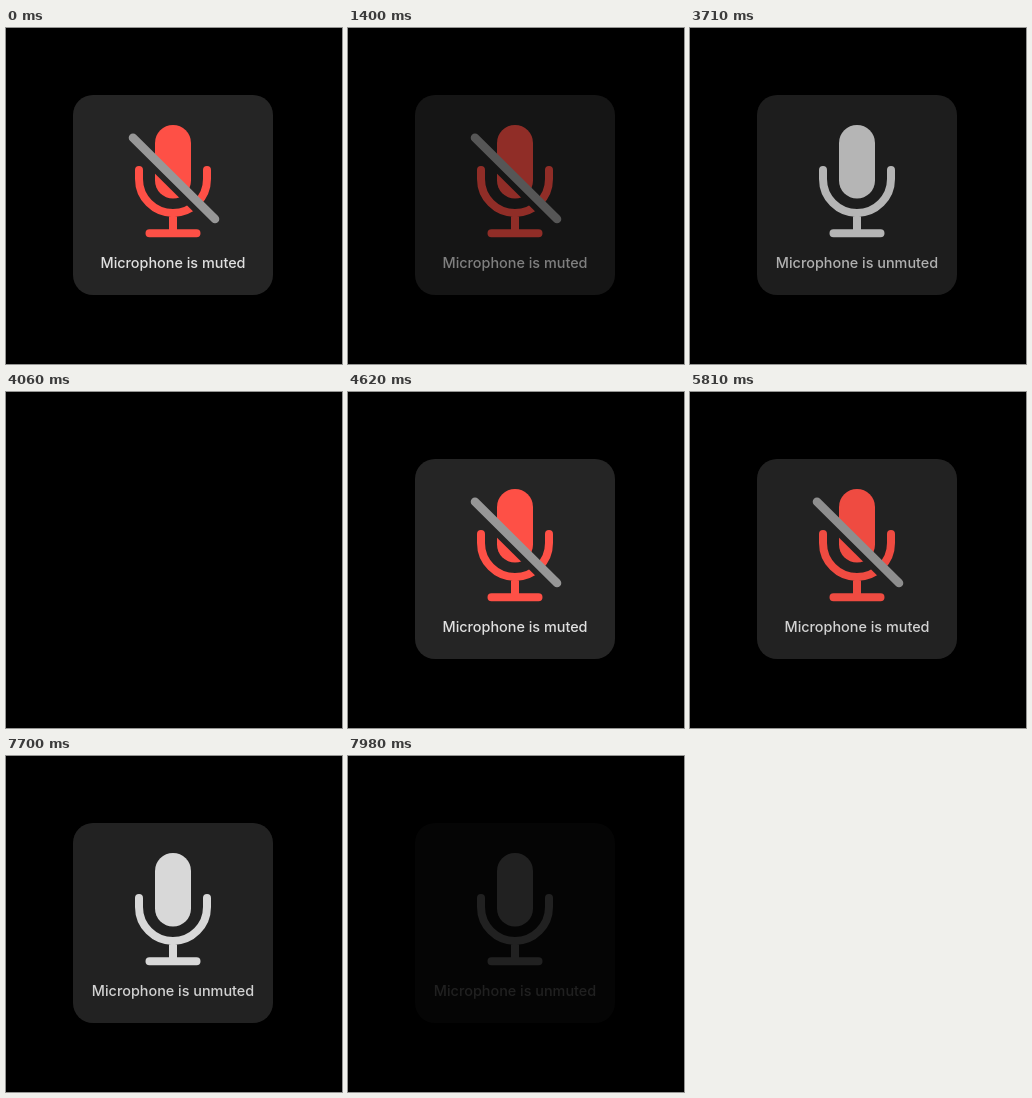
Animation of 336 by 336 pixels, one loop 8000 ms. Source, as an HTML page:

```html
<!DOCTYPE html>
<html lang="en">
<head>
<meta charset="utf-8">
<title>Microphone overlay</title>
<style>
  html, body { margin: 0; width: 100%; height: 100%; overflow: hidden; background: #000; }
  svg { display: block; width: 100vw; height: 100vh; }
  text { font: 500 14.4px Inter, Roboto, sans-serif; fill: #e0e0e0; text-anchor: middle; }
  .line { fill: none; stroke: currentColor; stroke-width: 8; stroke-linecap: round; }
</style>
</head>
<body>
<svg viewBox="0 0 336 336">
  <defs>
    <g id="mic">
      <rect x="149" y="97" width="36" height="73.5" rx="18" fill="currentColor"/>
      <path class="line" d="M133 142V151A34 34 0 0 0 201 151V142M167 185V205M143.5 205.3H190.5"/>
    </g>
    <mask id="gap" maskUnits="userSpaceOnUse" x="0" y="0" width="336" height="336">
      <rect width="336" height="336" fill="#fff"/>
      <path d="M117 100.1L219 200.9V214.9L117 114.1Z" fill="#000"/>
    </mask>
  </defs>
  <rect width="336" height="336"/>
  <g id="panel">
    <rect x="67" y="67" width="200" height="200" rx="20" fill="#252525"/>
    <g id="muted">
      <g mask="url(#gap)"><use href="#mic" color="#fe5046"/></g>
      <path d="M127 109.8L209 191" stroke="#979797" stroke-width="8.6" stroke-linecap="round"/>
    </g>
    <use id="live" href="#mic" color="#e6e6e6"/>
    <text id="label" x="167" y="240"></text>
  </g>
</svg>
<script>
  const LOOP = 8000, STEP = 70, FADE = 466;
  // Each showing appears at once, then eases out from `out`.
  const shows = [
    { at: 0, out: 1188, muted: true },
    { at: 2310, out: 3568, muted: false },
    { at: 4410, out: 5738, muted: true },
    { at: 6370, out: 7628, muted: false }
  ];
  const el = id => document.getElementById(id);
  const panel = el('panel'), muted = el('muted'), live = el('live'), label = el('label');

  function draw(ms) {
    const t = Math.floor((ms % LOOP) / STEP) * STEP;
    const show = shows.filter(s => s.at <= t).pop();
    const p = Math.min(1, Math.max(0, (t - show.out) / FADE));
    panel.setAttribute('opacity', (1 + Math.cos(Math.PI * p)) / 2);
    muted.style.display = show.muted ? '' : 'none';
    live.style.display = show.muted ? 'none' : '';
    label.textContent = 'Microphone is ' + (show.muted ? 'muted' : 'unmuted');
  }

  const start = performance.now();
  function tick(now) {
    draw(Math.max(0, now - start));
    requestAnimationFrame(tick);
  }
  draw(0);
  requestAnimationFrame(tick);
</script>
</body>
</html>
```
